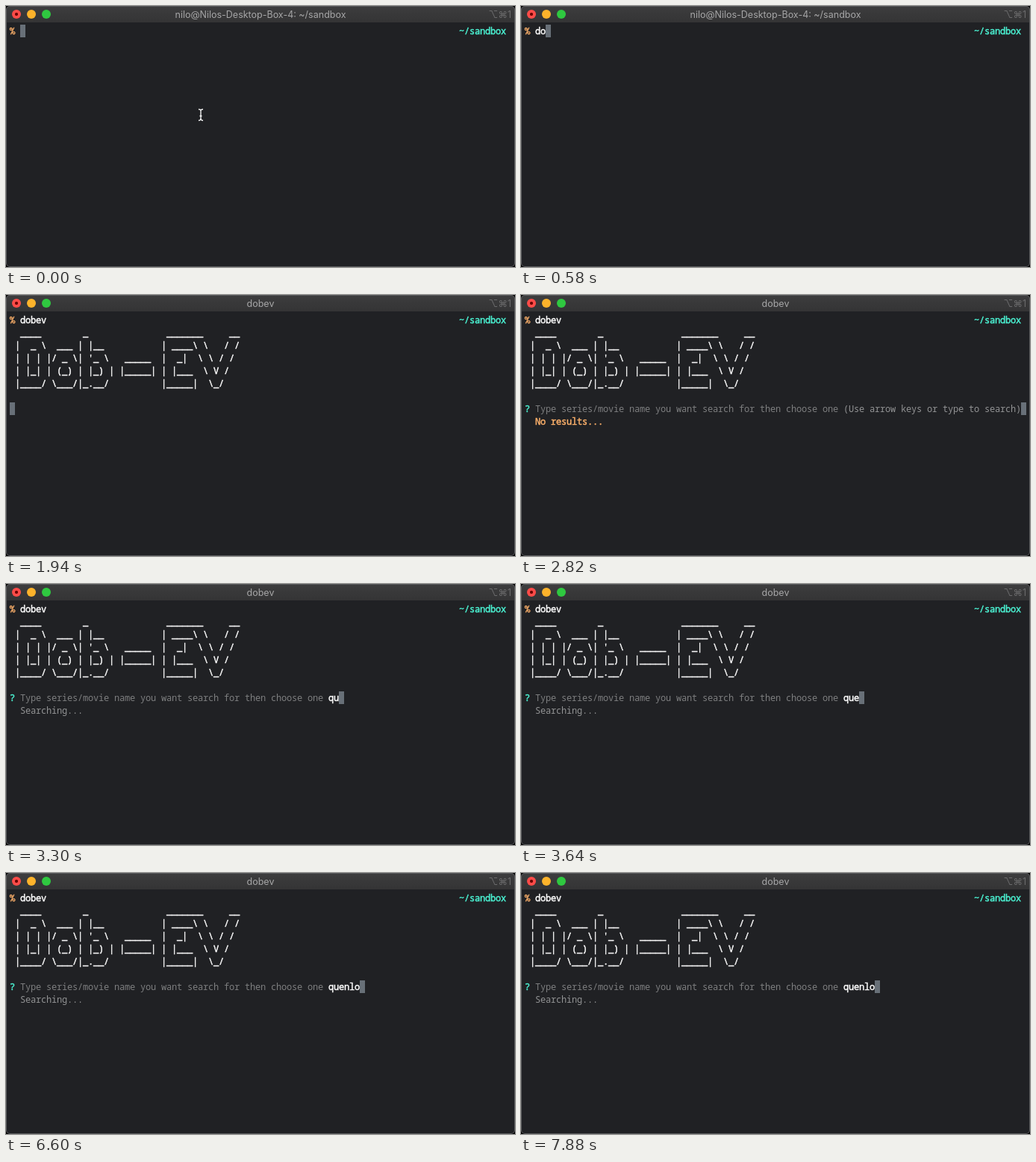
These frames come from a looping animation (682x350 px, 8000 ms). An HTML page:

```html
<!DOCTYPE html>
<html lang="en">
<head>
<meta charset="utf-8">
<title>Terminal</title>
<style>
html, body { margin: 0; width: 100%; height: 100%; overflow: hidden; background: #000; }
#window {
  position: relative; width: 682px; height: 350px; box-sizing: border-box;
  background: #202124; border-radius: 5px; overflow: hidden;
}
#window::after {
  content: ""; position: absolute; inset: 0; border: 1px solid #58595b; border-radius: 5px;
}
#bar {
  position: absolute; inset: 0 0 auto; height: 22px; background: linear-gradient(#3d3d3e, #343435);
  font: 12.5px/23px Inter, "DejaVu Sans", sans-serif; color: #a6a6a7; text-align: center;
}
#bar i { position: absolute; top: 5px; width: 12px; height: 12px; border-radius: 50%; }
#keys { position: absolute; right: 5px; top: 0; color: #6b6b6c; }
pre {
  position: absolute; top: 25px; left: 5px; margin: 0; color: #fff;
  font: 12px/17px "Noto Sans Mono", "DejaVu Sans Mono", monospace; letter-spacing: -.2px;
}
#path { left: 607px; }
b { font-weight: 400; -webkit-text-stroke: .45px; }
.orange { color: #ffb26b; }
.cyan { color: #4bf3d3; }
.dim { color: #7d7e7f; }
.hint { color: #929394; }
.cursor { display: inline-block; width: 7px; height: 17px; vertical-align: top; background: #687078; }
#pointer { position: absolute; left: 256px; top: 137px; fill: none; stroke: #fff; stroke-width: 1.3; }
</style>
</head>
<body>
<div id="window">
  <div id="bar">
    <i style="left:8px;background:radial-gradient(circle,#6d0504 1.7px,#fc4b48 2.5px)"></i>
    <i style="left:28px;background:#fdb32b"></i>
    <i style="left:48px;background:#2fc840"></i>
    <span id="title"></span>
    <span id="keys">⌥⌘1</span>
  </div>
  <pre id="screen"></pre>
  <pre id="path" class="cyan"><b>~/sandbox</b></pre>
  <svg id="pointer" width="10" height="18">
    <path d="M2 1.5Q5 1.5 5 4V14Q5 16.5 2 16.5M8 1.5Q5 1.5 5 4M5 14Q5 16.5 8 16.5M3.5 10.5H6.5"/>
  </svg>
</div>
<script>
const LOOP = 8000;
const COMMAND = "dobev", QUERY = "quenlo";
const COMMAND_KEYS = [320, 420, 600, 720, 840];
const QUERY_KEYS = [2920, 3240, 3640, 3780, 3860, 3960];
const ENTER = 1460, BANNER = 1860, PROMPT = 2120, EMPTY = 2320;

const BANNER_TEXT = String.raw`
  ____        _               _______     __
 |  _ \  ___ | |__           | ____\ \   / /
 | | | |/ _ \| '_ \   _____  |  _|  \ \ / /
 | |_| | (_) | |_) | |_____| | |___  \ V /
 |____/ \___/|_.__/          |_____|  \_/

`;

const $ = id => document.getElementById(id);
const cursor = '<span class="cursor"></span>';
const bold = (text, color = "") => `<b class="${color}">${text}</b>`;
const span = (text, color) => `<span class="${color}">${text}</span>`;
const typed = (text, keys, t) => text.slice(0, keys.filter(k => k <= t).length);

function search(t) {
  const query = typed(QUERY, QUERY_KEYS, t);
  const question = "Type series/movie name you want search for then choose one ";
  const input = query ? bold(query) : span("(Use arrow keys or type to search)", "hint");
  const status = !query && t >= EMPTY ? bold("No results...", "orange") : span("Searching...", "hint");
  return bold("? ", "cyan") + span(question, "dim") + input + cursor + "\n  " + status;
}

function screen(t) {
  const line = bold("% ", "orange") + bold(typed(COMMAND, COMMAND_KEYS, t));
  if (t < ENTER) return line + cursor;
  if (t < BANNER) return line + "\n" + cursor;
  return line + bold(BANNER_TEXT) + (t < PROMPT ? cursor : search(t));
}

let shown;
function draw(now) {
  const t = now % LOOP;
  const html = screen(t);
  if (html !== shown) {
    $("screen").innerHTML = shown = html;
    $("title").textContent = t < ENTER ? "nilo@Nilos-Desktop-Box-4: ~/sandbox" : COMMAND;
    $("pointer").style.display = t < COMMAND_KEYS[0] ? "" : "none";
  }
  requestAnimationFrame(draw);
}
draw(performance.now());
</script>
</body>
</html>
```
